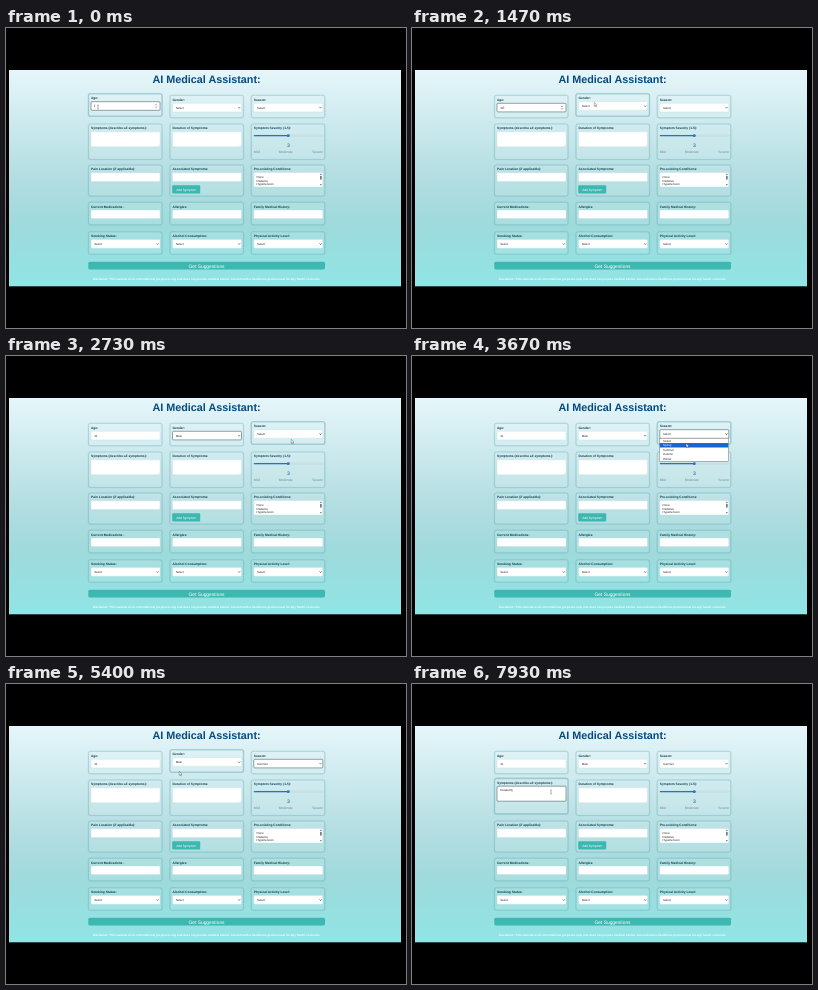
An HTML page that plays this animation: 400x300 px, repeating every 8000 ms.

```html
<!DOCTYPE html>
<html lang="en">
<head>
<meta charset="utf-8">
<title>Medical form</title>
<style>
html, body { margin: 0; width: 100%; height: 100%; overflow: hidden; background: #000; }
svg { display: block; width: 100vw; height: 100vh; }
text { font-family: "Liberation Sans", Arial, sans-serif; text-rendering: geometricPrecision; }
.label { font-size: 3.25px; font-weight: 700; fill: #123c4c; }
.value { font-size: 2.9px; fill: #222; }
.scale { font-size: 3.3px; fill: #6f8b92; }
.card { fill: #fff; fill-opacity: .1; stroke: #5fa9ae; stroke-opacity: .5; stroke-width: .5; }
.shade { fill: none; stroke: #2b7c86; stroke-opacity: .1; stroke-width: 1.6; }
.box { fill: #fff; stroke: #b9d8dc; stroke-width: .35; }
.teal { fill: #3db8b0; }
</style>
</head>
<body>
<svg id="stage" viewBox="0 0 400 300"></svg>
<script>
const LOOP = 8000;
const COLS = [82.5, 164, 245.3];
const ROWS = [
  { y: 67.3, h: 22.5, box: 8.6 },
  { y: 96, h: 35.5, box: 15 },
  { y: 137, h: 31, box: 8.6 },
  { y: 174.2, h: 22.6, box: 8.6 },
  { y: 203.8, h: 22.4, box: 8.6 }
];
const CARDS = [
  ["Age:", "number"], ["Gender:", "select"], ["Season:", "select"],
  ["Symptoms (describe all symptoms):", "area"], ["Duration of Symptoms:", "area"], ["Symptom Severity (1-5):", "slider"],
  ["Pain Location (if applicable):", "input"], ["Associated Symptoms:", "add"], ["Pre-existing Conditions:", "list"],
  ["Current Medications:", "input"], ["Allergies:", "input"], ["Family Medical History:", "input"],
  ["Smoking Status:", "select"], ["Alcohol Consumption:", "select"], ["Physical Activity Level:", "select"]
];
const AGE = 0, GENDER = 1, SEASON = 2, SYMPTOMS = 3;

// [card, enter, leave]
const HOVERS = [[AGE, -500, 1080], [GENDER, 1180, 2430], [SEASON, 2480, 4850], [GENDER, 5000, 5650], [SYMPTOMS, 5750, 9000]];
const FOCUS = [[AGE, 0, 1800], [GENDER, 1800, 3100], [SEASON, 3100, 6250], [SYMPTOMS, 6250, LOOP]];
const MENUS = [
  { card: GENDER, open: 1800, close: 2270, items: ["Select", "Male", "Female", "Other"], picks: [[1800, 0], [2020, 1]] },
  { card: SEASON, open: 3100, close: 4400, items: ["Select", "Spring", "Summer", "Autumn", "Winter"], picks: [[3100, 0], [3420, 1], [4050, 2]] }
];
// [time, x, y]
const PATH = [
  [0, 92, 79], [950, 92, 79], [1350, 183, 76], [1650, 183, 76], [1780, 181, 78], [2130, 178, 90],
  [2270, 178, 90], [2600, 286, 85], [2850, 286, 85], [3080, 279, 79], [3520, 275, 89], [3850, 275, 89],
  [4150, 274, 94], [4600, 274, 94], [5250, 174, 89], [5500, 174, 89], [5980, 139, 108], [LOOP, 139, 108]
];
const WORD = "Headach", TYPE_START = 6700, TYPE_STEP = 185;

const clamp = v => Math.max(0, Math.min(1, v));
const ease = v => { v = clamp(v); return v * v * (3 - 2 * v); };
const rect = (x, y, w, h, cls, r = 1, extra = "") =>
  `<rect x="${x}" y="${y}" width="${w}" height="${h}" rx="${r}" class="${cls}" ${extra}/>`;
const text = (x, y, str, cls, extra = "") => `<text x="${x}" y="${y}" class="${cls}" ${extra}>${str}</text>`;
const stroke = (d, color, width) => `<path d="${d}" fill="none" stroke="${color}" stroke-width="${width}"/>`;

function control(kind, i, x, y, h) {
  const box = rect(x, y, 69, h, "box", 1, `id="box${i}"`);
  const value = str => text(x + 3.2, y + 5.2, str, "value", `id="value${i}"`);
  switch (kind) {
    case "number":
      return box + value("") +
        `<g id="spinner">${stroke(`M${x + 64.2} ${y + 3.6}l.8 -1 .8 1M${x + 64.2} ${y + 5}l.8 1 .8 -1`, "#555", .5)}</g>`;
    case "select":
      return box + value("Select") + stroke(`M${x + 65.7} ${y + 3.8}l1 1.1 1 -1.1`, "#222", .55);
    case "area":
      return box + value("") + stroke(`M${x + 67} ${y + h - .6}l1.4 -1.4`, "#999", .25);
    case "slider":
      return rect(x, y + 3.2, 69, 1.3, "", .65, 'fill="#d5e3e6" stroke="#9db6bb" stroke-width=".2"') +
        rect(x, y + 3.2, 34.5, 1.3, "", .65, 'fill="#1976d2"') +
        `<circle cx="${x + 34.5}" cy="${y + 3.85}" r="1.45" fill="#1976d2"/>` +
        text(x + 34.5, y + 15.3, "3", "", 'font-size="5" fill="#14507c" text-anchor="middle"') +
        text(x, y + 20.9, "Mild", "scale") +
        text(x + 31.8, y + 20.9, "Moderate", "scale", 'text-anchor="middle"') +
        text(x + 69, y + 20.9, "Severe", "scale", 'text-anchor="end"');
    case "add":
      return box + rect(x - .3, y + 12.5, 28, 8.2, "teal") +
        text(x + 13.7, y + 17.7, "Add Symptom", "", 'font-size="3.2" fill="#fff" text-anchor="middle"');
    case "list":
      return rect(x, y - .4, 69, 14.6, "box") +
        ["None", "Diabetes", "Hypertension"].map((s, n) => text(x + 2.8, y + 5.1 + n * 3.6, s, "value")).join("") +
        rect(x + 66.3, y + 3, 1.5, 4, "", .7, 'fill="#666"') +
        `<path d="M${x + 66.2} ${y + 2}l.9 -1.3 .9 1.3zM${x + 66.2} ${y + 11.5}l.9 1.3 .9 -1.3z" fill="#333"/>`;
    default:
      return box;
  }
}

function card([label, kind], i) {
  const x = COLS[i % 3], { y, h, box } = ROWS[Math.floor(i / 3)];
  return `<g id="card${i}">` + rect(x, y, 73.5, h, "shade", 2, `id="shade${i}"`) + rect(x, y, 73.5, h, "card", 2) +
    text(x + 2.5, y + 5.4, label, "label") + control(kind, i, x + 2.5, y + (i < 3 ? 8 : 7.8), box) + "</g>";
}

function menu({ card, items }, n) {
  const x = COLS[card] + 2.2, y = 82.2, step = 4.45;
  return `<g id="menu${n}">` + rect(x, y, 69, items.length * step + .8, "", 0, 'fill="#fff" stroke="#555" stroke-width=".4"') +
    rect(x + .2, y + .4, 68.6, step, "", 0, `id="bar${n}" fill="#1766d0"`) +
    items.map((s, k) => text(x + 3.6, y + 3.6 + k * step, s, "value", `id="item${n}-${k}"`)).join("") + "</g>";
}

const stage = document.getElementById("stage");
stage.innerHTML = `
<defs><linearGradient id="sky" x1="0" y1="0" x2="0" y2="1">
  <stop offset="0" stop-color="#e6f6fa"/><stop offset=".5" stop-color="#b2dde1"/>
  <stop offset=".72" stop-color="#9edadc"/><stop offset="1" stop-color="#90e5e5"/>
</linearGradient></defs>
<rect width="400" height="300"/>
<rect x="3" y="42" width="392" height="216.3" fill="url(#sky)"/>
${text(200.5, 54.6, "AI Medical Assistant:", "", 'font-size="10.8" font-weight="700" fill="#054a80" text-anchor="middle"')}
${CARDS.map(card).join("")}
${rect(82.3, 233.8, 236.7, 7.8, "teal", 1.5)}
${text(200.5, 239.5, "Get Suggestions", "", 'font-size="4.9" fill="#fff" text-anchor="middle"')}
${text(200.5, 252.2, "Disclaimer: This website is for informational purposes only and does not provide medical advice. Consult with a healthcare professional for any health concerns.", "", 'font-size="2.97" font-weight="700" fill="#f4ffff" text-anchor="middle"')}
${stroke("M0 -1.4v2.8", "#222", .35).replace("<path", '<path id="caret"')}
${MENUS.map(menu).join("")}
<g id="pointer">
  <path id="arrow" d="M-.8 -1.6v3.9l.9 -.8 .7 1.5 .7 -.3 -.7 -1.5h1.2z" fill="#fff" stroke="#333" stroke-width=".35"/>
  <path id="beam" d="M-.8 -1.8h1.6M0 -1.8v3.6M-.8 1.8h1.6" fill="none" stroke="#444" stroke-width=".4"/>
</g>`;

const el = {};
stage.querySelectorAll("[id]").forEach(node => el[node.id] = node);
const show = (node, on) => node.setAttribute("visibility", on ? "visible" : "hidden");

function pointerAt(t) {
  const k = PATH.findIndex(p => p[0] > t);
  const [t0, x0, y0] = PATH[k - 1], [t1, x1, y1] = PATH[k];
  const f = ease((t - t0) / (t1 - t0));
  return [x0 + (x1 - x0) * f, y0 + (y1 - y0) * f];
}

function render(t) {
  const lift = CARDS.map(() => 0);
  for (const [i, enter, leave] of HOVERS) {
    lift[i] = Math.max(lift[i], ease((t - enter) / 250) * (1 - ease((t - leave) / 250)));
  }
  const [active] = FOCUS.find(([, start, end]) => t >= start && t < end);

  for (let i = 0; i < 4; i++) {
    el["card" + i].setAttribute("transform", `translate(0 ${-1.6 * lift[i]})`);
    el["shade" + i].style.strokeOpacity = .1 + .12 * lift[i];
    el["box" + i].style.stroke = i === active ? "#34454a" : "#b9d8dc";
    el["box" + i].style.strokeWidth = i === active ? .5 : .35;
  }

  const age = t < 600 ? "" : t < 820 ? "3" : "31";
  const typed = t < TYPE_START ? "" : WORD.slice(0, 1 + Math.floor((t - TYPE_START) / TYPE_STEP));
  el.value0.textContent = age;
  el.value1.textContent = t < MENUS[0].close ? "Select" : "Male";
  el.value2.textContent = t < MENUS[1].close ? "Select" : "Summer";
  el.value3.textContent = typed;
  show(el.spinner, active === AGE || lift[AGE] > .5);

  MENUS.forEach((m, n) => {
    const open = t >= m.open && t < m.close;
    show(el["menu" + n], open);
    const pick = m.picks.filter(p => p[0] <= t).pop()?.[1] ?? 0;
    el["bar" + n].setAttribute("transform", `translate(0 ${pick * 4.45})`);
    m.items.forEach((_, k) => el[`item${n}-${k}`].style.fill = k === pick ? "#fff" : "#222");
  });

  const field = el["value" + active];
  const cx = +field.getAttribute("x") + (field.textContent ? field.getComputedTextLength() : 0) + .3;
  const cy = +field.getAttribute("y") - 1 - 1.6 * lift[active];
  el.caret.setAttribute("transform", `translate(${cx} ${cy})`);
  show(el.caret, (active === AGE || active === SYMPTOMS) && (t % 1000 < 500 || t > TYPE_START));

  const [px, py] = pointerAt(t);
  const overText = t < 1050 || t > 5850;
  el.pointer.setAttribute("transform", `translate(${px} ${py})`);
  show(el.arrow, !overText);
  show(el.beam, overText);
}

function tick() {
  render(performance.now() % LOOP);
  requestAnimationFrame(tick);
}
tick();
</script>
</body>
</html>
```
